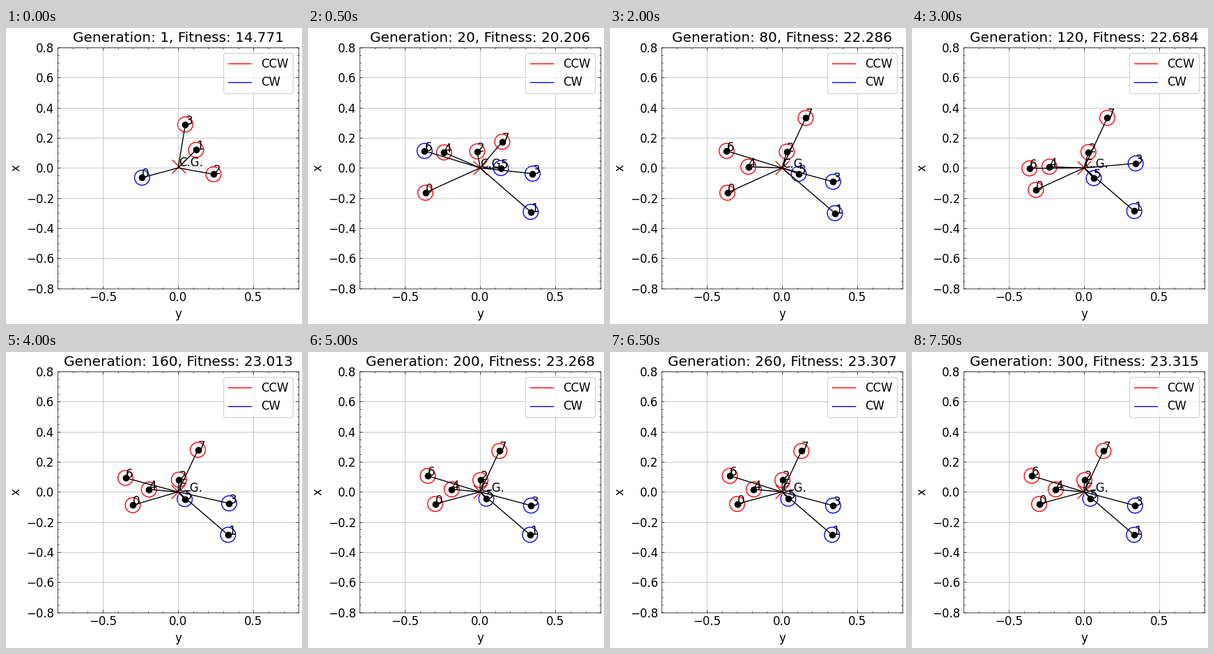
These frames come from a looping animation (425 by 426 pixels, 8 s). A matplotlib script:

```python
import matplotlib.pyplot as plt
import numpy as np
from matplotlib.animation import FuncAnimation
from matplotlib.lines import Line2D
from matplotlib.patches import Circle
from matplotlib.ticker import AutoMinorLocator, MultipleLocator

W, H, DPI = 425, 426, 100
SIDE = 346.4
LEFT, BOTTOM = 73.9, H - 374.55
STEPS, GENS_PER_STEP = 16, 20
CCW, CW = "red", "blue"
PROP_RADIUS = 0.05
CG_PULL = 0.13  # share of the rotors in the total mass

plt.rcParams.update({
    "font.family": "DejaVu Sans", "font.size": 12,
    "axes.titlesize": "large", "axes.linewidth": 0.5,
    "grid.linewidth": 0.5, "lines.linewidth": 1,
    "xtick.direction": "in", "ytick.direction": "in",
    "xtick.top": True, "ytick.right": True,
})

# Fitness grows along the logarithm of the generation
FITNESS = {1: 14.771, 40: 21.463, 80: 22.286, 120: 22.684,
           200: 23.268, 260: 23.307, 300: 23.315}

# Rotor positions at the main breakthroughs
SEED = np.array([(-0.239, -0.065), (0.119, 0.12),
                 (0.235, -0.042), (0.048, 0.289)])
LAYOUTS = {
    40: [(-0.363, -0.165), (0.336, -0.292), (-0.019, 0.11), (0.348, -0.038),
         (-0.239, 0.103), (0.138, -0.001), (-0.368, 0.113), (0.147, 0.174)],
    80: [(-0.363, -0.165), (0.35, -0.301), (0.031, 0.108), (0.338, -0.092),
         (-0.224, 0.008), (0.11, -0.039), (-0.368, 0.113), (0.156, 0.332)],
    120: [(-0.32, -0.146), (0.333, -0.287), (0.029, 0.105), (0.342, 0.03),
          (-0.23, 0.008), (0.064, -0.068), (-0.362, -0.003), (0.154, 0.333)],
    200: [(-0.298, -0.08), (0.331, -0.285), (0.002, 0.078), (0.338, -0.091),
          (-0.188, 0.017), (0.041, -0.045), (-0.347, 0.107), (0.128, 0.272)],
}


def fitness(gen):
    return np.interp(np.log(gen), np.log(list(FITNESS)),
                     list(FITNESS.values()))


def positions(gen):
    """Ease out from one breakthrough to the next: big gains come first."""
    if gen < GENS_PER_STEP:
        return SEED
    marks = list(LAYOUTS)
    k = np.interp(gen, marks, range(len(marks)))
    a = int(k)
    b = min(a + 1, len(marks) - 1)
    ease = 1 - (1 - (k - a)) ** 3
    start, end = np.array(LAYOUTS[marks[a]]), np.array(LAYOUTS[marks[b]])
    return start + (end - start) * ease


def clockwise(gen):
    if gen < GENS_PER_STEP:
        return {0}
    return {1, 3, 5, 6} if gen < 60 else {1, 3, 5}


fig = plt.figure(figsize=(W / DPI, H / DPI), dpi=DPI, facecolor="white")
ax = fig.add_axes([LEFT / W, BOTTOM / H, SIDE / W, SIDE / H])
ax.set(xlim=(-0.8, 0.8), ylim=(-0.8, 0.8), xlabel="y", ylabel="x")
for axis, spacing in ((ax.xaxis, 0.5), (ax.yaxis, 0.2)):
    axis.set_major_locator(MultipleLocator(spacing))
    axis.set_minor_locator(AutoMinorLocator())
ax.tick_params(which="major", length=3, width=0.5)
ax.tick_params(which="minor", length=1.5, width=0.5)
ax.grid(True)
ax.legend(handles=[Line2D([], [], color=CCW, label="CCW"),
                   Line2D([], [], color=CW, label="CW")], loc="upper right")
title = ax.set_title("")
drawn = []


def draw(step):
    while drawn:
        drawn.pop().remove()
    gen = max(1, GENS_PER_STEP * step)
    title.set_text(f"Generation: {gen}, Fitness: {fitness(gen):.3f}")

    spots, cw = positions(gen), clockwise(gen)
    for i, (x, y) in enumerate(spots):
        drawn.extend(ax.plot([0, x], [0, y], color="black"))
        drawn.extend(ax.plot(x, y, "o", color="black", markersize=6))
        drawn.append(ax.add_patch(
            Circle((x, y), PROP_RADIUS, fill=False,
                   edgecolor=CW if i in cw else CCW)))
        drawn.append(ax.text(x, y, str(i)))

    cg = CG_PULL * spots.mean(axis=0)
    drawn.append(ax.scatter(*cg, s=200, marker="x", color="red", linewidths=1))
    drawn.append(ax.text(*cg, "C.G."))
    return drawn


anim = FuncAnimation(fig, draw, frames=STEPS, interval=500,
                     repeat=True, repeat_delay=0, blit=False)
plt.show()
```
